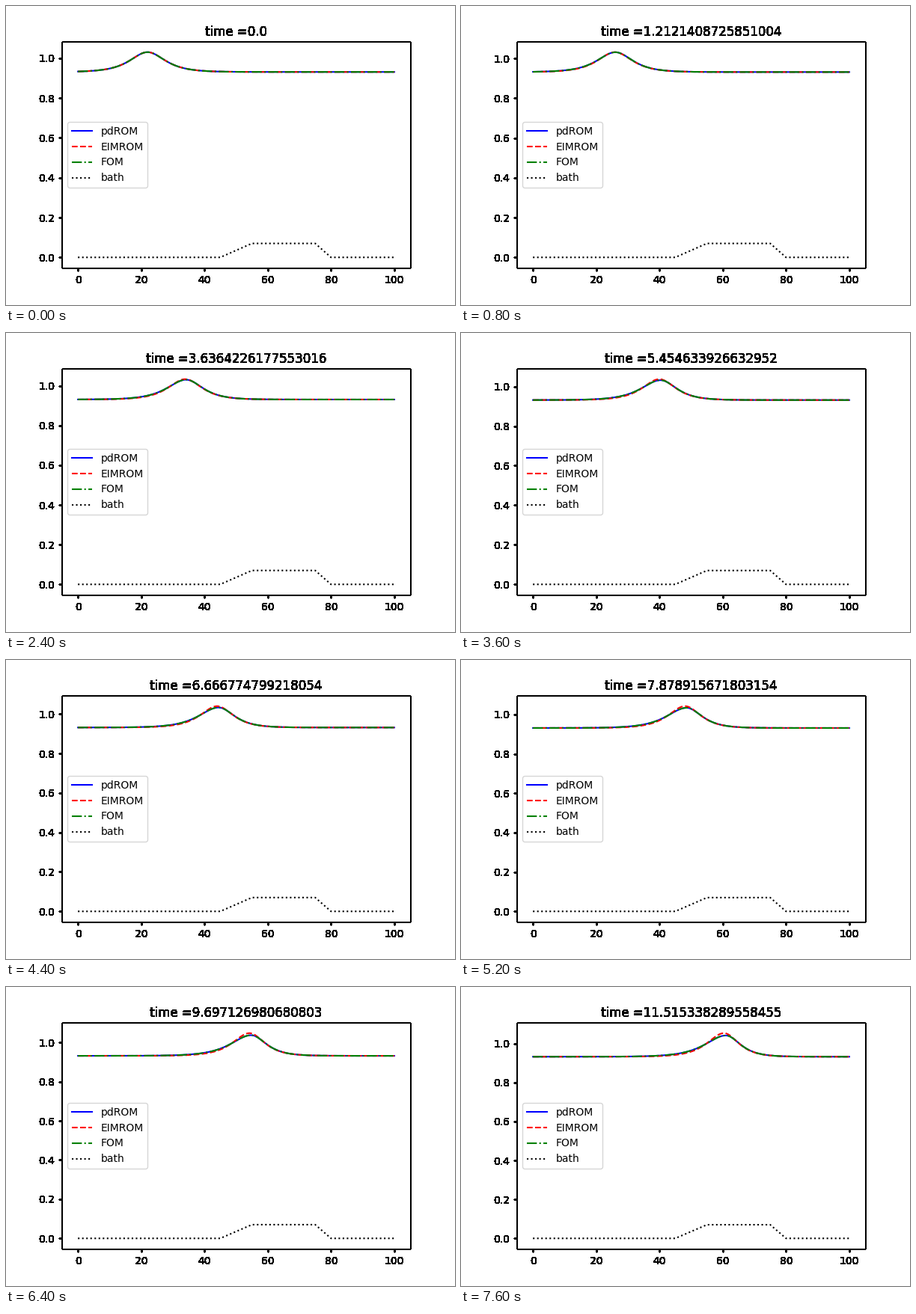
A matplotlib script for the animation above (8000 ms loop, 600 px wide and 400 px high).

```python
import numpy as np
import matplotlib.pyplot as plt
from matplotlib.animation import FuncAnimation

FRAMES, INTERVAL = 20, 400
END_TIME = 11.515338289558455

# Kerning is switched off in effect: glyphs keep their plain advance widths.
plt.rcParams.update({"font.family": "DejaVu Sans", "font.size": 10,
                     "text.kerning_factor": 6})

x = np.linspace(0, 100, 1001)
bath = np.interp(x, [45, 55, 75, 80], [0, 0.07, 0.07, 0])


def wave(center, base, peak, left, right):
    """Travelling hump with separate widths behind and ahead of its crest."""
    d = x - center
    return base + (peak - base) / np.cosh(d / np.where(d < 0, left, right))


def harden(image, dpi):
    """Make all but the faintest pixels opaque, like a dropped alpha channel."""
    pixels = np.rint(image * 255).astype(np.uint8)
    pixels[..., 3] = np.where(pixels[..., 3] > 8, 255, 0)
    return pixels, 0, 0


fig, ax = plt.subplots(figsize=(6, 4), dpi=100, facecolor="white")
fig.subplots_adjust(left=0.125, right=0.9, bottom=0.125, top=0.88)
ax.set_agg_filter(harden)

pd_line, = ax.plot(x, bath, "b-", label="pdROM")
eim_line, = ax.plot(x, bath, "r--", label="EIMROM")
fom_line, = ax.plot(x, bath, "g-.", label="FOM")
ax.plot(x, bath, "k:", label="bath")
ax.legend(loc="center left")
ax.set_xlim(-5, 105)
title = ax.set_title("")


def update(step):
    s = step / (FRAMES - 1)
    t = END_TIME * s

    # The crest moves evenly while its front steepens and its back stretches.
    center = 22 + 3.345 * t + 0.5 * s ** 2
    base = 0.9315 + 0.001 * s ** 4
    left = 4.9 + 0.9 * s ** 0.7
    right = 4.9 - 0.9 * s
    full = wave(center, base, 1.031 + 0.0105 * s ** 3, left, right)

    # The coarser model drifts: taller, slightly behind and thinner at the back.
    drift = s ** 0.6
    reduced = wave(center - 0.6 * drift, base, 1.031 + 0.0225 * s ** 1.7,
                   left - 1.1 * drift, right)

    pd_line.set_ydata(full)
    fom_line.set_ydata(full)
    eim_line.set_ydata(reduced)

    top = max(full.max(), reduced.max())
    ax.set_ylim(-0.05 * top, 1.05 * top)
    title.set_text(f"time ={t}")
    return pd_line, eim_line, fom_line, title


anim = FuncAnimation(fig, update, frames=FRAMES, interval=INTERVAL,
                     repeat=True, repeat_delay=0, blit=False)
plt.show()
```
